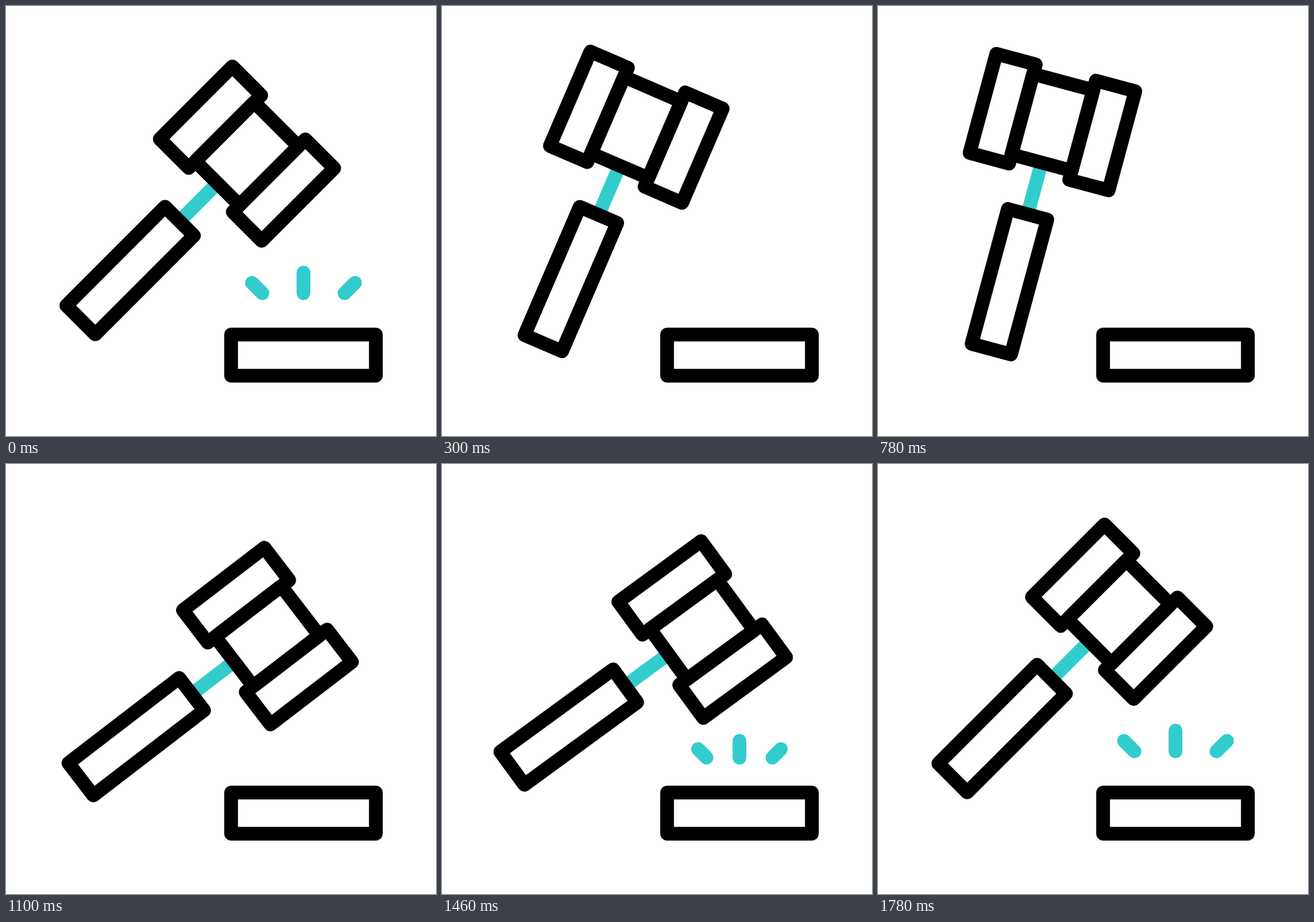
Recreate the animation shown at these times as an HTML page with a canvas. Size 640 by 640 pixels, loop 1800 ms.

```html
<!DOCTYPE html>
<html lang="en">
<head>
<meta charset="utf-8">
<title>Gavel</title>
<style>
  html, body { margin: 0; width: 100%; height: 100%; overflow: hidden; background: #fff; }
  canvas { display: block; width: 100vmin; height: 100vmin; }
</style>
</head>
<body>
<canvas id="stage" width="640" height="640"></canvas>
<script>
const ctx = document.getElementById('stage').getContext('2d');
const LOOP = 1800, LIFT = 840, DROP = 1002, HIT = 1200, FADE = 200;
const BLACK = '#000', TEAL = '#33cccc';
const PIVOT = [221.3, 381.7];
const BURST = [442.75, 475];

// Offsets of the pivot while striking and bouncing back.
const STRIKE = [[0, 0], [2.6, 15], [14.5, 24.8], [31.5, 16.5]];
const BOUNCE = [[31.5, 16.5], [32, 2], [5.5, 8.5], [0, 0]];

// Inner and outer ends of the sparks, relative to the burst centre.
const SPARKS = [
  [-61, -47.3, -76.7, -63],
  [0, -47.3, 0, -78.3],
  [61, -47.3, 76.7, -63]
];

const clamp = v => Math.min(1, Math.max(0, v));
const mix = (a, b, k) => a + (b - a) * k;

function cubic(a, b, c, d, s) {
  const r = 1 - s;
  return r * r * r * a + 3 * r * r * s * b + 3 * r * s * s * c + s * s * s * d;
}

function pointOn(path, s) {
  return [0, 1].map(i => cubic(...path.map(p => p[i]), s));
}

// Quick start with a long settle: cubic-bezier(.167, .167, .167, 1).
function ease(x) {
  x = clamp(x);
  let lo = 0, hi = 1;
  for (let i = 0; i < 24; i++) {
    const mid = (lo + hi) / 2;
    if (cubic(0, 0.167, 0.167, 1, mid) < x) lo = mid; else hi = mid;
  }
  return cubic(0, 0.167, 1, 1, (lo + hi) / 2);
}

function pose(t) {
  if (t < DROP) return { angle: mix(45, 75, ease(t / LIFT)), shift: [0, 0] };
  if (t < HIT) {
    const k = (t - DROP) / (HIT - DROP);
    return { angle: mix(75, 0, k), shift: pointOn(STRIKE, k) };
  }
  const k = ease((t - HIT) / (LOOP - HIT));
  return { angle: 45 * k, shift: pointOn(BOUNCE, k) };
}

function line(x1, y1, x2, y2, cap) {
  ctx.strokeStyle = TEAL;
  ctx.lineCap = cap;
  ctx.beginPath();
  ctx.moveTo(x1, y1);
  ctx.lineTo(x2, y2);
  ctx.stroke();
}

function box(x, y, w, h) {
  ctx.strokeStyle = BLACK;
  ctx.strokeRect(x, y, w, h);
}

function drawSparks(t) {
  let grow = 1, trim = 0;
  if (t < FADE) trim = t / FADE;
  else if (t > HIT) grow = ease((t - HIT) / (LOOP - HIT));
  else return;
  ctx.save();
  ctx.translate(...BURST);
  for (const [x1, y1, x2, y2] of SPARKS) {
    line(mix(x1, x2, trim) * grow, mix(y1, y2, trim) * grow, x2 * grow, y2 * grow, 'round');
  }
  ctx.restore();
}

function drawGavel(t) {
  const { angle, shift } = pose(t);
  ctx.save();
  ctx.translate(PIVOT[0] + shift[0], PIVOT[1] + shift[1]);
  ctx.rotate(-angle * Math.PI / 180);
  line(69.6, -17.3, 149.4, -17.3, 'butt');
  box(-138.3, -47.7, 207.9, 60.8);
  box(149.4, -63.7, 124, 92.8);
  box(135.3, -124.4, 152.8, 60.8);
  box(135.3, 29.1, 152.8, 60.8);
  ctx.restore();
}

function draw(t) {
  ctx.fillStyle = '#fff';
  ctx.fillRect(0, 0, 640, 640);
  ctx.lineWidth = 20.5;
  ctx.lineJoin = 'round';
  drawSparks(t);
  box(335, 489, 215.5, 61.3);
  drawGavel(t);
}

const start = performance.now();
function tick() {
  draw((performance.now() - start) % LOOP);
  requestAnimationFrame(tick);
}
tick();
</script>
</body>
</html>
```
